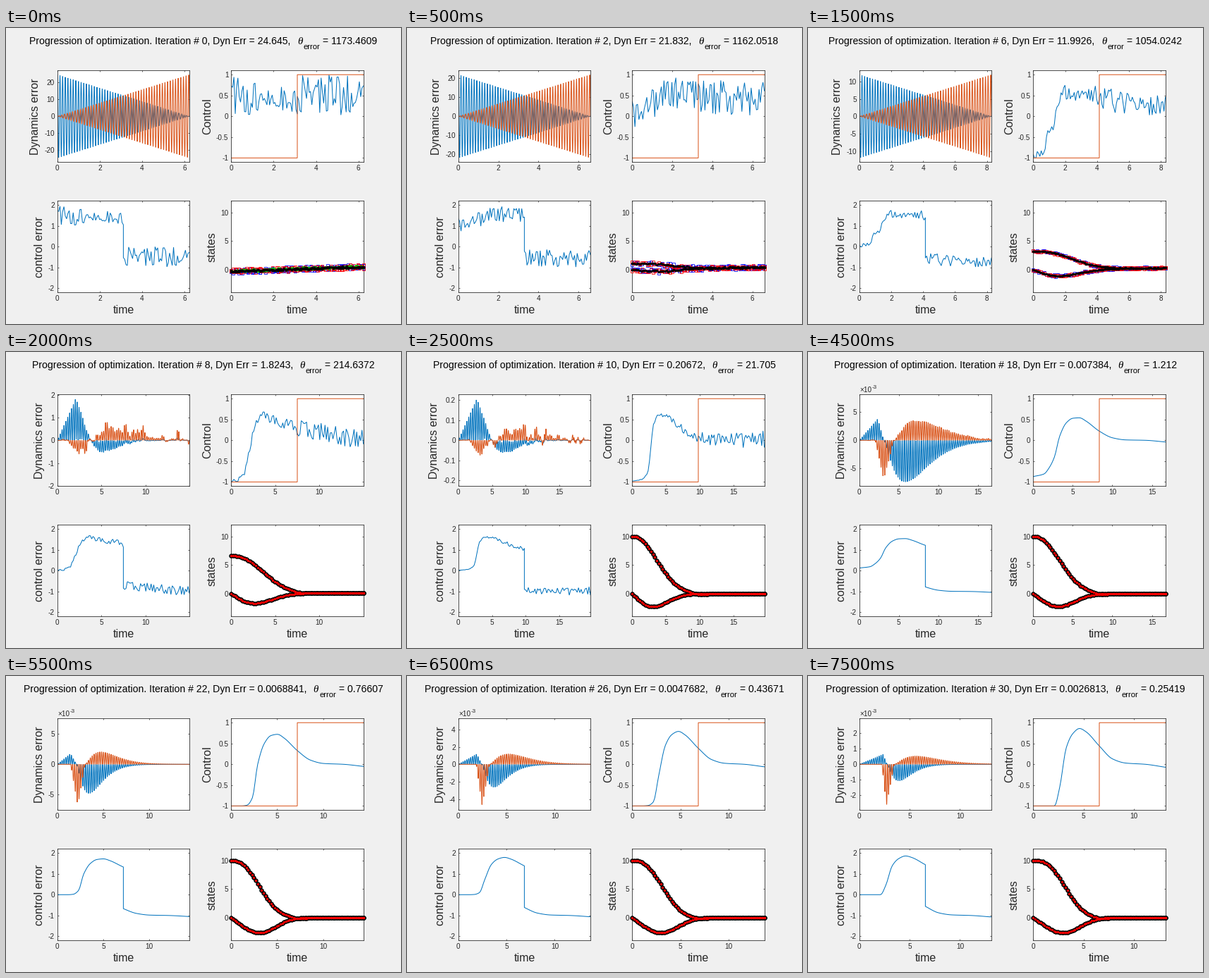
Animation of 560 by 420 pixels, one loop 8000 ms. Source, as a matplotlib script:

```python
import numpy as np
import matplotlib as mpl
import matplotlib.pyplot as plt
from matplotlib.animation import FuncAnimation
from matplotlib.ticker import FuncFormatter

W, H, DPI = 560, 420, 70
PX = 72 / DPI
FRAMES, INTERVAL = 16, 500
BLUE, ORANGE, INK = "#0072BD", "#D95319", "#262626"

mpl.rcParams.update({
    "font.family": "Liberation Sans",
    "axes.unicode_minus": False,
    "axes.linewidth": 0.8 * PX,
    "axes.edgecolor": INK,
    "xtick.color": INK,
    "ytick.color": INK,
    "lines.linewidth": 1.0 * PX,
    "lines.solid_joinstyle": "miter",
    "path.simplify": False,
})

# Dynamics error, parameter error and horizon for each step.
STEPS = [
    ("24.645", "1173.4609", 6.23), ("21.832", "1162.0518", 6.6),
    ("17.4185", "1118.3746", 7.3), ("11.9926", "1054.0242", 8.28),
    ("1.8243", "214.6372", 15.0), ("0.20672", "21.705", 19.6),
    ("0.0085631", "0.96321", 19.0), ("0.013784", "2.2321", 18.15),
    ("0.008431", "1.7261", 17.4), ("0.007384", "1.212", 16.7),
    ("0.013912", "1.4612", 15.4), ("0.0068841", "0.76607", 14.38),
    ("0.0059127", "0.58214", 14.0), ("0.0047682", "0.43671", 13.7),
    ("0.0036415", "0.33862", 13.4), ("0.0026813", "0.25419", 13.12),
]

# Shapes are given at these steps and blended between them.
KEYS = [0, 3, 5, 7, 9, 11, 15]
KNOTS = np.array([0, .08, .12, .16, .2, .25, .3, .35, .4, .5, .6, .7, .85, 1])
CONTROL = np.array([
    [.5] * 14,
    [-.95, -.85, -.33, -.12, .35, .58, .55, .6, .62, .5, .42, .3, .2, .2],
    [-.98, -.93, -.72, .35, .63, .6, .48, .35, .22, .08, .02, 0, 0, 0],
    [-.9, -.85, -.68, -.1, .33, .53, .54, .45, .32, .12, .03, 0, 0, -.04],
    [-.87, -.81, -.66, -.4, .1, .42, .53, .54, .46, .22, .06, .01, 0, -.04],
    [-1, -1, -.98, -.8, 0, .5, .69, .72, .63, .33, .1, .02, 0, -.05],
    [-1, -1, -1, -1, -.55, .4, .74, .86, .78, .44, .13, .03, 0, -.07],
])
# Control noise at 0, 0.3, 0.6 and 1 of the horizon.
NOISE = np.array([
    [.5, .5, .5, .5], [.1, .2, .32, .3], [0, .07, .18, .23],
    [0, 0, .03, .05], [0] * 4, [0] * 4, [0] * 4,
])
# Position: height, width, power; velocity: depth, place of minimum, power.
STATES = np.array([
    [0, .37, 2.4, 0, .2, 2], [3.2, .37, 2.42, 1.15, .2, 2],
    [10, .247, 2.15, 2.3, .155, 2.2], [10, .248, 2.27, 2.3, .165, 2.2],
    [10, .261, 2.17, 2.25, .19, 2.5], [10, .261, 2.41, 2.65, .21, 2.8],
    [10, .286, 2.69, 2.65, .225, 3],
])
# Per line: peak, start, tip, zero crossing, lobe height, lobe centre; noise.
ENVELOPE_KEYS = KEYS[2:]
ENVELOPE = np.array([
    [1, 0, .14, .25, -.28, .35, -.4, .08, .165, .26, .3, .4, .22],
    [.47, 0, .13, .16, -1, .285, -.9, .12, .17, .24, .6, .32, .18],
    [.52, 0, .14, .185, -1, .35, -.95, .12, .185, .26, .48, .435, .03],
    [.26, 0, .1, .145, -.7, .24, -1, .1, .155, .21, .3, .33, 0],
    [.24, 0, .18, .21, -.4, .3, -1, .17, .205, .265, .2, .43, 0],
])


def blend(table, step, keys=KEYS):
    return np.array([np.interp(step, keys, col) for col in table.T])


def smooth(x, xk, yk):
    """Shape-preserving cubic through the knots."""
    h, d = np.diff(xk), np.diff(yk) / np.diff(xk)
    m = np.zeros_like(yk)
    same = d[:-1] * d[1:] > 0
    m[1:-1][same] = 2 * (d[:-1] * d[1:])[same] / (d[:-1] + d[1:])[same]
    m[0], m[-1] = d[0], d[-1]
    i = np.clip(np.searchsorted(xk, x, side="right") - 1, 0, len(h) - 1)
    t = (x - xk[i]) / h[i]
    return ((1 + 2 * t) * (1 - t) ** 2 * yk[i] + t * (1 - t) ** 2 * h[i] * m[i]
            + t * t * (3 - 2 * t) * yk[i + 1] + t * t * (t - 1) * h[i] * m[i + 1])


def envelope(s, peak, start, tip, zero, lobe, centre):
    x = np.clip((s - zero) / (centre - zero), 0, None)
    return (np.interp(s, [start, tip, zero], [0, peak, 0])
            + lobe * (x * np.exp(1 - x)) ** 1.5)


def dynamics(s, step, rng):
    if step <= 3:
        phase = 100 * np.pi * s
        return (1 - s) * np.cos(phase), -s * np.sin(phase)
    par = blend(ENVELOPE, step, ENVELOPE_KEYS)
    ripple = np.sin(70 * np.pi * s) ** 2
    grid = np.linspace(0, 1, 71)
    rough = np.interp(s, grid, rng.uniform(-1, 1, 71) ** 3)
    gain = par[12] * np.interp(s, [0, .1, .3, 1], [0, .4, 1, 1.3])
    blue = envelope(s, *par[:6]) * ripple + .3 * gain * rough
    orange = (envelope(s, *par[6:12]) + gain * rough * 1.5) * ripple
    return blue, orange


def states(s, step):
    height, width, power, depth, low, fall = blend(STATES, step)
    early = np.interp(step, [0, 3, 5], [1, .6, 0])
    drift = early * np.interp(s, [0, 1], [-.3 * (step < 1), .5])
    pos = height * np.exp(-(s / width) ** power)
    pos -= .024 * height * (step > 3) * np.exp(-((s - .51) / .07) ** 2)
    x = s / low
    vel = -depth * x * np.exp((1 - x ** fall) / fall)
    return pos + drift, vel + drift


def panel(left, top, ylabel, ylim, xlabel=None):
    ax = fig.add_axes([left / W, 1 - (top + 130) / H, 187.2 / W, 130 / H])
    ax.tick_params(direction="in", top=True, right=True, length=2 * PX,
                   width=.7 * PX, labelsize=10 * PX, pad=4 * PX)
    ax.set_ylabel(ylabel, fontsize=16 * PX, color=INK, labelpad=5 * PX)
    ax.set_ylim(ylim)
    if xlabel:
        ax.set_xlabel(xlabel, fontsize=16 * PX, color=INK, labelpad=4 * PX)
    return ax


def label(size, y, **kw):
    return fig.text(0, 1 - y / H, "", fontsize=size * PX, va="baseline", **kw)


def dots(fmt, size, color, filled=True):
    face = color if filled else "none"
    return [ax_st.plot([], [], fmt, color=color, ms=size * PX, mec=color, mfc=face,
                       mew=.8 * PX, clip_on=False, zorder=4)[0]
            for _ in range(2)]


fig = plt.figure(figsize=(W / DPI, H / DPI), dpi=DPI, facecolor="#f0f0f0")

ax_dyn = panel(72.8, 60.3, "Dynamics error", (-1, 1))
ax_u = panel(319.4, 60.3, "Control", (-1.1, 1.1))
ax_err = panel(72.8, 245.3, "control error", (-2.2, 2.2), "time")
ax_st = panel(319.4, 245.3, "states", (-4, 12), "time")
axes = (ax_dyn, ax_u, ax_err, ax_st)
ax_u.set_yticks([-1, -.5, 0, .5, 1])
ax_err.set_yticks([-2, -1, 0, 1, 2])
ax_st.set_yticks([0, 5, 10])
for ax in axes:
    ax.xaxis.set_major_formatter(FuncFormatter(lambda v, _: f"{v:g}"))
    ax.yaxis.set_major_formatter(FuncFormatter(lambda v, _: f"{v:g}"))

dyn_lines = [ax_dyn.plot([], [], color=c)[0] for c in (BLUE, ORANGE)]
u_line, = ax_u.plot([], [], color=BLUE)
goal_line, = ax_u.plot([], [], color=ORANGE)
err_line, = ax_err.plot([], [], color=BLUE)

blue_box = dots("s", 4.5, "#0000ff", False)
red_box = dots("s", 5, "#ff0000", False)
green = [ax_st.plot([], [], color="#00c000", lw=2 * PX, zorder=4)[0] for _ in range(2)]
core = dots("o-", 2.8, "black")
rim = dots("o", 5.6, "black")
red_dot = dots("o", 2.5, "#ff0000")

head, tail = label(14, 23), label(14, 23)
theta = label(15, 23, family="Liberation Serif", style="italic")
sub = label(11.2, 30)
theta.set_text("\u03b8")
sub.set_text("error")
scale = [label(10, 57, color=INK), label(8, 52.5, color=INK)]
scale[0].set_x(73.5 / W)
scale[1].set_x(91 / W)


def set_title(step, err, th):
    head.set_text(f"Progression of optimization. Iteration # {2 * step}, Dyn Err = {err},")
    tail.set_text(f"= {th}")
    w_head, w_sub, w_tail = (t.get_window_extent().width for t in (head, sub, tail))
    x = 279.7 - (w_head + w_sub + w_tail + 21.7) / 2
    for text, advance in ((head, w_head + 9.3), (theta, 8.5),
                          (sub, w_sub + 3.9), (tail, 0)):
        text.set_x(x / W)
        x += advance


def set_dyn_axis(limit):
    target = limit / 1.5
    base = 10 ** np.floor(np.log10(target))
    unit = base * max(m for m in (1, 2, 5) if m * base <= target)
    n = int(limit / unit)
    small = unit < .0099
    ticks = unit * np.arange(-n, n + 1)
    ax_dyn.set_ylim(-limit, limit)
    ax_dyn.set_yticks(ticks, [f"{v * (1000 if small else 1):g}" for v in ticks])
    scale[0].set_text("\u00d710" if small else "")
    scale[1].set_text("-3" if small else "")


def set_states(step, horizon, rng):
    s = np.linspace(0, 1, 71)
    t = s * horizon
    rough = step <= 3
    amp = np.interp(step, [0, 3], [.4, .15])
    for i, y in enumerate(states(s, step)):
        def jitter(a):
            return y + rng.uniform(-a, a, s.size)
        blue_box[i].set_data(t, jitter(1.1 * amp))
        red_box[i].set_data(t, jitter(amp))
        green[i].set_data(t, jitter(.8 * amp))
        core[i].set_data(t, jitter(.4 * amp))
        rim[i].set_data(t, y)
        red_dot[i].set_data(t, y)
        for group in (blue_box, red_box, core):
            group[i].set_visible(rough)
        green[i].set_visible(step == 0)
        rim[i].set_visible(not rough)
        red_dot[i].set_visible(not rough)


def draw(step):
    rng = np.random.default_rng(40 + step)
    err, th, horizon = STEPS[step]
    set_title(step, err, th)
    for ax in axes:
        ax.set_xlim(0, horizon)
        ax.set_xticks(np.arange(0, horizon, 2 if horizon < 10 else 5))

    peak = float(err)
    set_dyn_axis(1.1 * peak)
    s = np.linspace(0, 1, 1401)
    for line, y in zip(dyn_lines, dynamics(s, step, rng)):
        line.set_data(s * horizon, peak * y)

    s = np.sort(np.append(np.linspace(0, 1, 101), .4999))
    amp = np.interp(s, [0, .3, .6, 1], blend(NOISE, step))
    u = smooth(s, KNOTS, blend(CONTROL, step)) + amp * rng.uniform(-1, 1, s.size)
    u = np.clip(u, -1, 1)
    goal = np.where(s < .5, -1, 1)
    u_line.set_data(s * horizon, u)
    goal_line.set_data(s * horizon, goal)
    err_line.set_data(s * horizon, u - goal)

    set_states(step, horizon, rng)
    return []


anim = FuncAnimation(fig, draw, frames=FRAMES, interval=INTERVAL, repeat=True)
plt.show()
```
